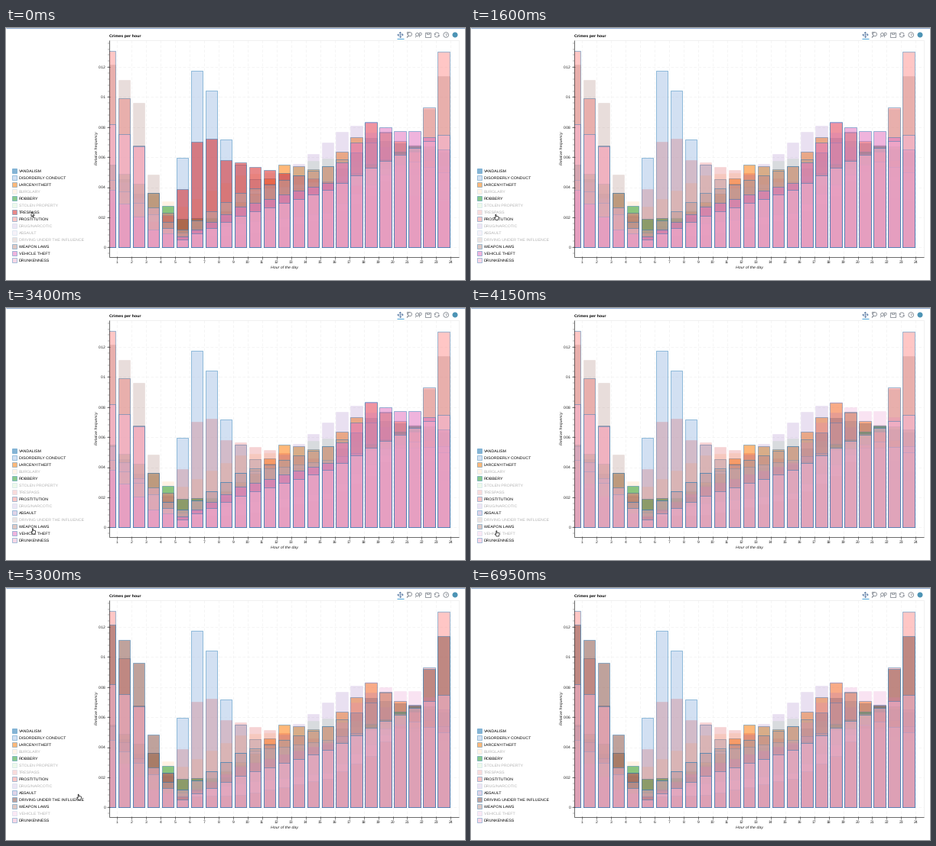
These frames come from a looping animation (600x330 px, 7 s). A matplotlib script:

```python
import numpy as np
import matplotlib as mpl
import matplotlib.pyplot as plt
from matplotlib.animation import FuncAnimation
from matplotlib.collections import LineCollection, PolyCollection
from matplotlib.colors import to_rgba
from matplotlib.patches import Circle, Polygon, Rectangle

mpl.rcParams.update({"font.family": "Liberation Sans", "text.hinting": "none",
                     "toolbar": "None"})

W, H, DPI = 600, 330, 100
FRAMES, STEP = 140, 50
PX = 72 / DPI
LEFT, RIGHT, TOP, BOTTOM = 135.4, 592, 15.5, 299.5
ZERO_Y, UNIT = 287.2, 1.967      # pixels per 0.001
HOUR_W, BAR_W = 18.98, 15.2
FILL, BLUE, INK = 0.55, "#1f77b4", "#222222"
HOURS = np.arange(24)

fig = plt.figure(figsize=(W / DPI, H / DPI), dpi=DPI, facecolor="white")
ax = fig.add_axes([0, 0, 1, 1])
ax.set(xlim=(0, W), ylim=(H, 0))
ax.axis("off")
plot_area = Rectangle((LEFT, TOP), RIGHT - LEFT, BOTTOM - TOP,
                      fc="none", ec="#e8e8e8", lw=0.6 * PX, zorder=1)
ax.add_patch(plot_area)


def label(x, y, s, size, color=INK, **kw):
    kw = {"ha": "center", "va": "center_baseline", "zorder": 30} | kw
    return ax.text(x, y, s, fontsize=size * PX, color=color, **kw)


def lines(segs, color, width, z, **kw):
    ax.add_collection(LineCollection(segs, colors=color, linewidths=width * PX,
                                     zorder=z, **kw), autolim=False)


# ---- relative frequency per hour, in thousandths ----
def rhythm(*levels):
    """Daily course through midnight, night, dawn, morning, afternoon, dusk, late."""
    return np.interp(HOURS, (0, 3, 5, 9, 15, 18, 23), levels)


def bump(hour, height, before, after=None):
    d = HOURS - hour
    width = np.where(d < 0, before, after or before)
    return height * np.exp(-0.5 * (d / width) ** 2)


SERIES = {
    "VANDALISM": rhythm(55, 26, 10, 28, 42, 73, 63),
    "DISORDERLY CONDUCT": rhythm(33, 18, 10, 45, 36, 36, 32) + bump(6, 99, 0.85, 1.4),
    "LARCENY/THEFT": rhythm(38, 10, 6, 30, 54, 83, 52) + bump(12, 13, 1),
    "BURGLARY": rhythm(46, 34, 27, 48, 52, 54, 45),
    "ROBBERY": rhythm(55, 36, 19, 20, 38, 55, 63) + bump(21, 8, 1.2),
    "STOLEN PROPERTY": rhythm(40, 20, 10, 30, 57, 58, 45) + bump(13.5, 6, 1),
    "TRESPASS": rhythm(30, 17, 18, 55, 44, 40, 31) + bump(6.3, 45, 1.05),
    "PROSTITUTION": rhythm(131, 36, 10, 16, 23, 42, 74) + bump(23, 56, 0.8),
    "DRUG/NARCOTIC": rhythm(33, 12, 8, 28, 69, 74, 37) + bump(16.7, 9, 0.8),
    "ASSAULT": rhythm(54, 22, 12, 36, 45, 52, 54),
    "DRIVING UNDER THE INFLUENCE": (rhythm(119, 38, 7, 8, 19, 34, 84)
                                    + bump(1.8, 32, 0.8) + bump(23, 30, 1)),
    "WEAPON LAWS": rhythm(45, 22, 12, 36, 54, 68, 50) + bump(19, 12, 0.5),
    "VEHICLE THEFT": rhythm(38, 12, 7, 27, 43, 83.5, 63) + bump(21.5, 7, 1),
    "DRUNKENNESS": rhythm(81, 20, 5, 21, 38, 53, 75) + bump(1.8, 28, 0.7),
}
PALETTE = plt.get_cmap("tab20").colors
MUTED = {"BURGLARY", "STOLEN PROPERTY", "DRUG/NARCOTIC", "ASSAULT",
         "DRIVING UNDER THE INFLUENCE"}
CLICKS = [(1400, "TRESPASS"), (2500, "ASSAULT"), (3700, "VEHICLE THEFT"),
          (5000, "DRIVING UNDER THE INFLUENCE")]


def bar(hour, value):
    x0 = LEFT + hour * HOUR_W - BAR_W / 2
    x1, y = x0 + BAR_W, ZERO_Y - value * UNIT
    return [(x0, ZERO_Y), (x0, y), (x1, y), (x1, ZERO_Y)]


# ---- bars and legend ----
items = []
for i, ((name, values), color) in enumerate(zip(SERIES.items(), PALETTE)):
    bars = PolyCollection([bar(h, v) for h, v in zip(HOURS, values)],
                          linewidths=0.8 * PX, zorder=5 + i * 0.1)
    ax.add_collection(bars, autolim=False)
    bars.set_clip_path(plot_area)
    y = 186.6 + 9 * i
    box = Rectangle((8.2, y - 3), 6, 6, lw=0.7 * PX, zorder=30)
    ax.add_patch(box)
    text = label(17, y + 0.1, name, 5.25, "black", ha="left")
    items.append((name, color, bars, box, text))

# ---- grid and axes ----
ticks_x = LEFT + (HOURS + 0.5) * HOUR_W
ticks_y = ZERO_Y - np.arange(0, 121, 20) * UNIT
minor_y = ZERO_Y - np.arange(-4, 138, 4) * UNIT
grid = [[(x, TOP), (x, BOTTOM)] for x in ticks_x]
grid += [[(LEFT, y), (RIGHT, y)] for y in ticks_y]
lines(grid, "#f0f0f0", 0.6, 2, linestyles=(0, (6, 4)))

lines([[(LEFT, TOP), (LEFT, BOTTOM)], [(LEFT, BOTTOM), (RIGHT, BOTTOM)]],
      "#333333", 0.7, 20)
lines([[(LEFT - 3, y), (LEFT + 1, y)] for y in ticks_y]
      + [[(x, BOTTOM - 1), (x, BOTTOM + 3)] for x in ticks_x], "#333333", 0.6, 20)
lines([[(LEFT - 2, y), (LEFT, y)] for y in minor_y], "#555555", 0.45, 20)

for n, y in enumerate(ticks_y):
    label(131, y, f"{n * 0.02:.2g}", 5, ha="right")
for n, x in enumerate(ticks_x):
    label(x, 305.9, str(n + 1), 5)
label(135.4, 10.3, "Crimes per hour", 5.35, "black", ha="left", weight="bold")
label(363.5, 313.4, "Hour of the day", 5.3, style="italic")
label(118.4, 157.5, "Relative frequency", 5.3, style="italic", rotation=90,
      va="center")

# ---- page edge and toolbar ----
lines([[(0, 0.4), (W, 0.4)]], "#8fa9d0", 1.2, 30)
GREY = "#7d838c"


def ring(x, y, r):
    ax.add_patch(Circle((x, y), r, fc="none", ec=GREY, lw=0.8 * PX, zorder=30))


def icon(segs, color=GREY, width=0.8):
    lines(segs, color, width, 30)


for a in range(0, 360, 90):
    c, s = np.cos(np.radians(a)), np.sin(np.radians(a))
    arm = np.array([(0, 0), (3.5, 0), (2.3, -1.2), (3.5, 0), (2.3, 1.2)])
    icon([arm @ np.array([(c, s), (-s, c)]) + (515.5, 9)], "#6b87ad")
icon([[(511, 14.3), (520, 14.3)]], "#4aa3d8", 1)
ring(528, 8.2, 2.5)
icon([[(526.2, 10.2), (524, 12.5)]], width=1.2)
icon([[(524, 8), (524, 5.3), (527, 5.3)]])
ring(537.6, 8.6, 2)
ring(541.6, 7.8, 1.6)
icon([[(536.3, 10.4), (535.3, 12.4)], [(540.8, 9.4), (540.2, 12.2)]])
icon([[(548.2, 5.7), (554.8, 5.7), (554.8, 12.3), (548.2, 12.3), (548.2, 5.7)],
      [(549.8, 5.7), (549.8, 8), (553.2, 8), (553.2, 5.7)]])
for a in (25, 205):
    t = np.radians(np.linspace(a, a + 135, 12))
    icon([np.c_[563.2 + 3 * np.cos(t), 9 + 3 * np.sin(t)]])
icon([[(560, 7.2), (560.4, 9), (562, 8)], [(566.4, 10.8), (566, 9), (564.4, 10)]])
ring(575.2, 9, 3.3)
label(575.2, 9.1, "?", 5, GREY, weight="bold")
ax.add_patch(Circle((587, 9), 3.5, fc="#4d94b5", ec="none", zorder=30))

# ---- mouse pointer ----
ARROW = np.array([(-1, -3), (-1, 3), (0.4, 1.8), (1.4, 4), (2.3, 3.6), (1.4, 1.4),
                  (3.3, 1.3)])
HAND = np.array([(-1.4, -3.6), (-0.5, -3.6), (-0.4, -1), (0.6, -1.3), (2.2, -0.8),
                 (3, -0.1), (2, 3.6), (-0.9, 3.6), (-2.9, 0.8), (-2.4, 0.2),
                 (-1.4, 0.9)])
pointer = Polygon(HAND, closed=True, fc="white", ec=INK, lw=0.75 * PX, zorder=40)
ax.add_patch(pointer)

# (time, x, y): rest on a row, then glide to the next
PATH = [(0, 34, 244), (1500, 34, 245), (2250, 29, 266), (2600, 29, 268),
        (3300, 36, 292), (4300, 34, 296), (4850, 95, 275), (5600, 96, 273),
        (6300, -10, 262)]


def draw(k):
    t = k * STEP
    muted = set(MUTED)
    for when, name in CLICKS:
        if t >= when:
            muted ^= {name}
    for name, color, bars, box, text in items:
        off = name in muted
        bars.set_facecolor(to_rgba(color, 0.2 if off else FILL))
        bars.set_edgecolor(to_rgba(color, 0.08) if off else to_rgba(BLUE, FILL))
        fade = 0.3 if off else 1
        box.set_facecolor(to_rgba(color, FILL * fade))
        box.set_edgecolor(to_rgba(BLUE, FILL * fade))
        text.set_alpha(fade)
    times, xs, ys = zip(*PATH)
    shape = ARROW if t < 500 else HAND
    pointer.set_xy(shape + (np.interp(t, times, xs), np.interp(t, times, ys)))
    return []


anim = FuncAnimation(fig, draw, frames=FRAMES, interval=STEP, repeat=True,
                     repeat_delay=0, blit=False)
plt.show()
```
